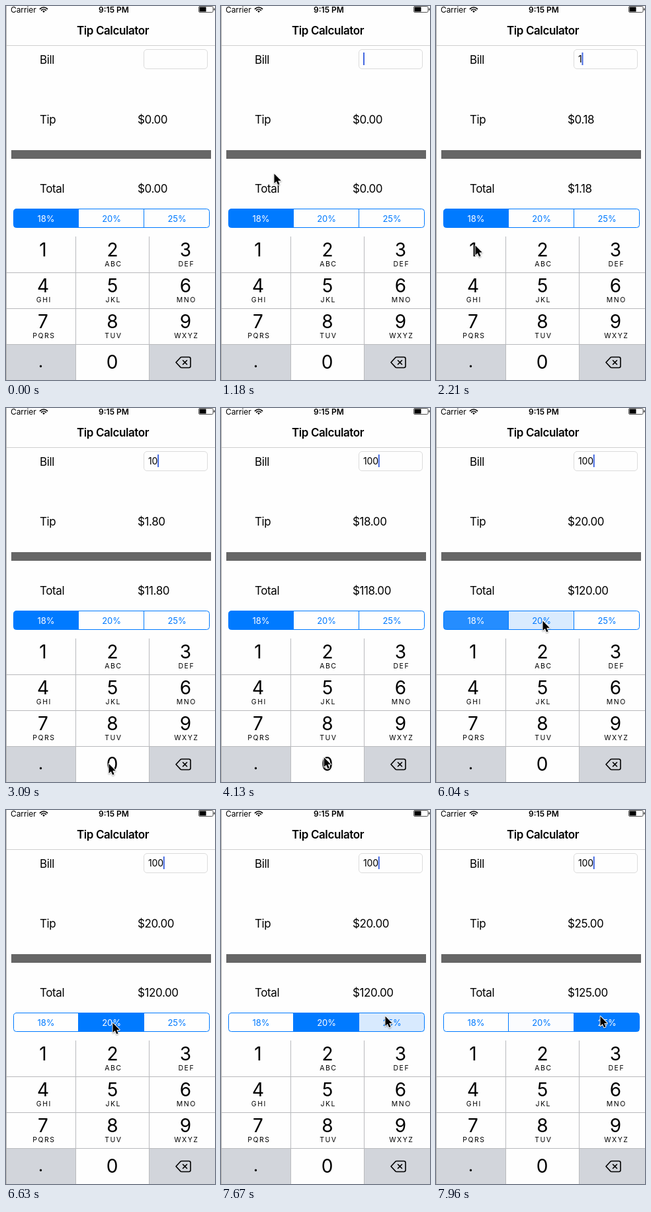
Animation of 316x563 px, one loop 8 s. Source, as an HTML page with a canvas:

```html
<!DOCTYPE html>
<html lang="en">
<head>
<meta charset="utf-8">
<title>Tip Calculator</title>
<style>
  html, body { margin: 0; width: 100%; height: 100%; overflow: hidden; background: #fff; }
  canvas { display: block; width: 316px; height: 563px; }
</style>
</head>
<body>
<canvas id="stage"></canvas>
<script>
const W = 316, H = 563, LOOP = 8000, STEP = 147.4;
const BLUE = '#007aff', KEY_GRAY = '#d2d5db', LINE = '#b9babd';
const canvas = document.getElementById('stage');
const ctx = canvas.getContext('2d');
const dpr = window.devicePixelRatio || 1;
canvas.width = W * dpr;
canvas.height = H * dpr;

// Bill entries: [time, text, caret blink start]
const entries = [[0, '', 140], [2060, '1', 2060], [2940, '10', 2940], [3680, '100', 3620]];
// Key taps: [down, up, column, row]
const taps = [[1910, 2060, 0, 0], [2790, 2940, 1, 3], [3530, 3680, 1, 3]];
// Segment picks: [touch, select, index]
const picks = [[-900, -800, 0], [5890, 6030, 1], [7660, 7800, 2]];
const rates = [18, 20, 25];
// Pointer: [time, x, y]
const path = [
  [440, 258, 215], [1175, 80, 252], [1470, 60, 338], [1620, 59, 360], [2215, 59, 360],
  [2650, 155, 535], [4020, 155, 535], [4860, 161, 320], [6640, 161, 320], [7370, 248, 310]
];

const colX = [1, 106, 217, 316];
const rowY = [347, 402, 456, 510, 563];
const segX = [12, 110, 209, 307];
const subs = ['', 'ABC', 'DEF', 'GHI', 'JKL', 'MNO', 'PQRS', 'TUV', 'WXYZ'];

const clamp = v => Math.max(0, Math.min(1, v));
const last = (list, t) => list.filter(e => e[0] <= t).pop();

function text(str, x, y, size, opt = {}) {
  const { weight = 400, align = 'left', color = '#000', gap = 0 } = opt;
  ctx.font = `${weight} ${size}px Inter, Roboto, sans-serif`;
  ctx.letterSpacing = gap + 'px';
  ctx.textAlign = align;
  ctx.fillStyle = color;
  ctx.fillText(str, x, y);
  return ctx.measureText(str).width;
}

function rect(x, y, w, h, color) {
  ctx.fillStyle = color;
  ctx.fillRect(x, y, w, h);
}

function rounded(x, y, w, h, r) {
  ctx.beginPath();
  ctx.roundRect(x, y, w, h, r);
}

function poly(points) {
  ctx.beginPath();
  points.forEach(([x, y]) => ctx.lineTo(x, y));
  ctx.closePath();
}

function statusBar() {
  text('Carrier', 7, 10, 12, { gap: -0.1 });
  text('9:15 PM', 163, 10, 12, { weight: 600, align: 'center' });
  ctx.strokeStyle = '#000';
  ctx.lineWidth = 1.7;
  for (const r of [4.8, 7.8]) {
    ctx.beginPath();
    ctx.arc(57, 9.8, r, -Math.PI * 0.75, -Math.PI * 0.25);
    ctx.stroke();
  }
  ctx.fillStyle = '#000';
  ctx.beginPath();
  ctx.moveTo(57, 10);
  ctx.arc(57, 9.8, 2.6, -Math.PI * 0.75, -Math.PI * 0.25);
  ctx.fill();
  ctx.lineWidth = 1;
  ctx.strokeStyle = '#555';
  rounded(291.5, 0.5, 21.5, 9, 1.5);
  ctx.stroke();
  rect(292.5, 1.5, 10, 7, '#000');
  rect(314, 3.5, 1.5, 3, '#333');
}

function form(t) {
  const [, bill, blink] = last(entries, t);
  const pick = picks.filter(p => p[1] <= t).pop();
  const tip = Number(bill) * rates[pick[2]] / 100;
  const money = v => '$' + v.toFixed(2);
  const body = { gap: -0.4 };

  text('Tip Calculator', 161.5, 43, 17, { weight: 600, align: 'center', gap: -0.4 });
  rect(0, 59, W, 1, '#cfcfcf');
  text('Bill', 51, 86.5, 17, body);
  text('Tip', 51, 176.5, 17, body);
  text('Total', 51, 280.5, 17, body);
  text(money(tip), 199, 176.5, 17, body);
  text(money(Number(bill) + tip), 199, 280.5, 17, body);
  rect(8, 217, 302, 13, '#666');

  ctx.strokeStyle = '#dcdcdc';
  ctx.lineWidth = 1;
  rounded(208.5, 65.5, 96, 29, 4.5);
  ctx.stroke();
  const w = text(bill, 215, 84.5, 14, { gap: -0.2 });
  if (t >= blink && (t - blink) % 1000 < 630) rect(215 + w, 70, 2, 19, '#4468e0');
}

function segments(t) {
  const now = picks.filter(p => p[1] <= t).pop();
  const before = picks[picks.indexOf(now) - 1];
  const touched = last(picks, t);
  const u = 1 - (1 - clamp((t - now[1]) / 180)) ** 2;

  ctx.save();
  rounded(11.5, 305.5, 296, 28, 4);
  ctx.clip();
  rates.forEach((rate, i) => {
    let fill = 0;
    if (i === now[2]) fill = u;
    else if (before && i === before[2]) fill = 1 - u;
    else if (i === touched[2]) fill = 0.15;
    ctx.globalAlpha = fill;
    rect(segX[i] - 1, 305, segX[i + 1] - segX[i] + 1, 29, BLUE);
    ctx.globalAlpha = 1;
    const color = fill > 0.5 ? '#fff' : BLUE;
    text(rate + '%', [60.5, 159.5, 258.5][i], 324.5, 13, { align: 'center', color, gap: -0.1 });
  });
  ctx.restore();
  ctx.strokeStyle = BLUE;
  ctx.lineWidth = 1;
  rounded(11.5, 305.5, 296, 28, 4);
  ctx.stroke();
  rect(109, 306, 1, 27, BLUE);
  rect(208, 306, 1, 27, BLUE);
}

function keyBack(c, r, color) {
  rect(colX[c], rowY[r], colX[c + 1] - colX[c], rowY[r + 1] - rowY[r], color);
}

function keypad(t) {
  keyBack(0, 3, KEY_GRAY);
  keyBack(2, 3, KEY_GRAY);
  for (const [down, up, c, r] of taps) if (t >= down && t < up) keyBack(c, r, KEY_GRAY);
  for (const y of [401, 455, 509]) rect(0, y, W, 1, LINE);
  for (const x of [105, 216]) rect(x, 347, 1, H - 347, LINE);

  const mid = [56, 161, 271.5];
  subs.forEach((sub, i) => {
    const x = mid[i % 3], y = 377 + 54 * Math.floor(i / 3);
    text(String(i + 1), x, y, 28, { align: 'center' });
    text(sub, x + 1.3, y + 15, 10.5, { align: 'center', gap: 1.5 });
  });
  text('0', 160.5, 546, 28, { align: 'center' });
  text('.', 52.5, 544, 26, { align: 'center' });

  ctx.strokeStyle = '#000';
  ctx.lineWidth = 1.6;
  ctx.lineJoin = ctx.lineCap = 'round';
  ctx.beginPath();
  ctx.moveTo(257, 536.5);
  ctx.lineTo(263.5, 529.5);
  ctx.arcTo(264.5, 528.5, 267, 528.5, 2);
  ctx.arcTo(279, 528.5, 279, 536, 2.5);
  ctx.arcTo(279, 544.5, 270, 544.5, 2.5);
  ctx.arcTo(264.5, 544.5, 263.5, 543.5, 2);
  ctx.closePath();
  ctx.moveTo(267.5, 533.5);
  ctx.lineTo(273.5, 539.5);
  ctx.moveTo(273.5, 533.5);
  ctx.lineTo(267.5, 539.5);
  ctx.stroke();
}

function pointer(t) {
  if (t < path[0][0]) return;
  const i = path.filter(p => p[0] <= t).length - 1;
  const a = path[i], b = path[i + 1] || a;
  const u = b === a ? 0 : (t - a[0]) / (b[0] - a[0]);
  const k = u * u * (3 - 2 * u);
  ctx.save();
  ctx.translate(a[1] + (b[1] - a[1]) * k, a[2] + (b[2] - a[2]) * k);
  poly([[0.5, 0.5], [0.5, 15], [3.8, 11.9], [6.2, 17.3], [8.6, 16.3], [6.3, 11], [10.8, 11]]);
  ctx.lineJoin = 'round';
  ctx.lineWidth = 1.8;
  ctx.strokeStyle = '#fff';
  ctx.shadowColor = 'rgba(0,0,0,0.35)';
  ctx.shadowBlur = 2 * dpr;
  ctx.shadowOffsetY = dpr;
  ctx.stroke();
  ctx.shadowColor = 'transparent';
  ctx.fillStyle = '#000';
  ctx.fill();
  ctx.restore();
}

function draw(t) {
  ctx.setTransform(dpr, 0, 0, dpr, 0, 0);
  rect(0, 0, W, H, '#fefefe');
  statusBar();
  form(t);
  segments(t);
  keypad(t);
  rect(0, 0, 1, H, '#b0b0b0');
  pointer(t);
}

const start = performance.now();
function frame() {
  const t = (performance.now() - start) % LOOP;
  draw(Math.floor((t + 4) / STEP) * STEP);
  requestAnimationFrame(frame);
}
frame();
</script>
</body>
</html>
```
